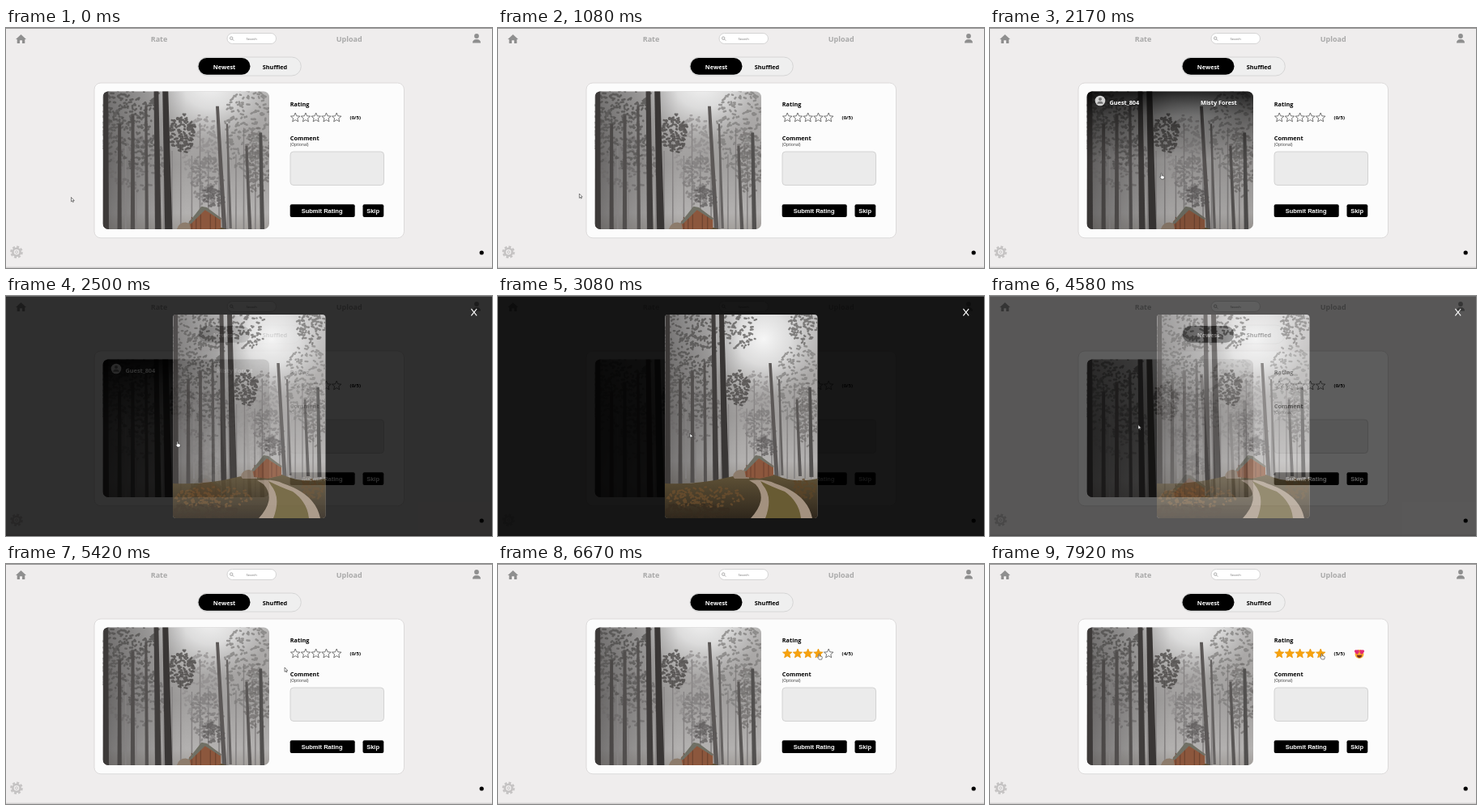
Recreate the animation shown at these times as an HTML page. Size 600x297 px, loop 8000 ms.

```html
<!DOCTYPE html>
<html lang="en">
<head>
<meta charset="utf-8">
<title>Photo rating</title>
<style>
  html, body { margin: 0; width: 100%; height: 100%; overflow: hidden; background: #efeded; }
  svg { display: block; }
  text { font: 700 7.3px "Open Sans", "Noto Sans", sans-serif; }
  .nav { font-size: 9px; fill: #a9a9a9; }
  .small { font-weight: 400; font-size: 4.9px; fill: #333; }
  .button { font: 700 7.5px "Liberation Sans", Arial, sans-serif; fill: #fff; }
  .light { fill: #fff; }
</style>
</head>
<body>
<svg id="stage" width="100%" height="100%" viewBox="0 0 600 297">
  <defs>
    <linearGradient id="fog" x2="0" y2="1">
      <stop stop-color="#c2c1c1"/><stop offset=".3" stop-color="#aaa8a7"/>
      <stop offset=".5" stop-color="#a19f9e"/><stop offset=".72" stop-color="#b3b1b0"/>
      <stop offset=".85" stop-color="#96918b"/>
    </linearGradient>
    <radialGradient id="sky" gradientUnits="userSpaceOnUse" cx="122" cy="30" r="72">
      <stop stop-color="#f6f6f6"/><stop offset=".45" stop-color="#e4e4e4" stop-opacity=".85"/>
      <stop offset="1" stop-color="#ccc" stop-opacity="0"/>
    </radialGradient>
    <linearGradient id="shade">
      <stop stop-color="#2e2c2c" stop-opacity=".5"/><stop offset=".5" stop-color="#444" stop-opacity="0"/>
    </linearGradient>
    <linearGradient id="ground" x2="0" y2="1">
      <stop stop-color="#625438"/><stop offset="1" stop-color="#2f271c"/>
    </linearGradient>
    <linearGradient id="hoverShade" x2="0" y2="1">
      <stop stop-opacity=".85"/><stop offset=".18" stop-opacity=".45"/><stop offset=".5" stop-opacity=".08"/>
    </linearGradient>
    <clipPath id="cardClip"><rect x="119.5" y="78.5" width="205.5" height="170.5" rx="7"/></clipPath>
    <clipPath id="modalClip"><rect x="206" y="23" width="188.5" height="252" rx="4"/></clipPath>

    <g id="photo">
      <rect width="189" height="252" fill="url(#fog)"/>
      <rect width="189" height="120" fill="url(#sky)"/>
      <rect width="189" height="252" fill="url(#shade)"/>
      <g id="farTrees"></g>
      <g id="nearTrees"></g>
      <path d="M0 209Q40 211 80 201T140 200T189 203V252H0Z" fill="url(#ground)"/>
      <g id="heather"></g>
      <path d="M104 205Q125 203 136 209Q176 222 182 252H106Q128 228 112 210Z" fill="#a3917f"/>
      <path d="M118 206Q134 214 148 219Q166 232 168 252H124Q134 226 121 211Z" fill="#685b33"/>
      <path d="M84 200Q86 192 94 192L104 195V203H86Z" fill="#8d7c6c"/>
      <path d="M98 191L115 175L134 187V199L117 203L100 201Z" fill="#8c573d"/>
      <path d="M101 186V201M106 184V201M111 181V202M122 183V201M128 185V200" stroke="#633c2b" stroke-width=".8"/>
      <path d="M97 193L112 174L118 175L135 188L133 189L116 178L100 194Z" fill="#707065"/>
    </g>
    <path id="arrow" d="M0 0V5.4L1.3 4.3L2.1 6.1L2.9 5.7L2.1 4H3.8Z" fill="#fff" stroke="#222" stroke-width=".55"/>
    <path id="hand" d="M-.6 .4Q0-.5 .6 .4V2.6L3.4 3.3Q4 3.6 3.8 4.6L3.2 7H0L-2 4.3Q-2 3.3-.6 4.2Z" fill="#fff" stroke="#222" stroke-width=".55"/>
  </defs>

  <rect width="600" height="297" fill="#efeded"/>
  <path d="M0 296.2H600" stroke="#c4c2c2"/>

  <!-- navigation -->
  <path d="M12 14L18.5 8L25 14H23.3V19H20V15.2H17V19H13.7V14Z" fill="#8f8f8f"/>
  <text class="nav" x="178.7" y="16.5">Rate</text>
  <text class="nav" x="407.7" y="16.5">Upload</text>
  <rect x="273" y="6.5" width="60.5" height="13" rx="6.5" fill="#fff" stroke="#ccc" stroke-width=".8"/>
  <g fill="none" stroke="#888" stroke-width=".7"><circle cx="278.2" cy="12.6" r="1.7"/><path d="M279.5 13.9L281.2 15.6"/></g>
  <text class="small" x="296.5" y="14.7" style="font-size:4.3px;fill:#777">Search</text>
  <path d="M576 18.5Q576 14 581 14T586 18.5Z" fill="#8f8f8f"/>
  <circle cx="581" cy="10" r="2.9" fill="#8f8f8f"/>

  <rect x="236.8" y="36" width="127.5" height="23" rx="11.5" fill="#efefef" stroke="#cfcfcf" stroke-width=".8"/>
  <rect x="237.5" y="37" width="64" height="20.8" rx="10.4"/>
  <text class="light" x="255.8" y="50.6">Newest</text>
  <text x="316.8" y="50.6">Shuffled</text>

  <!-- rating card -->
  <rect x="109" y="68" width="382.5" height="191.8" rx="8" fill="#fcfcfc" stroke="#d6d4d4" stroke-width=".8"/>
  <g clip-path="url(#cardClip)">
    <use href="#photo" transform="translate(119.5 31.5) scale(1.088)"/>
    <g id="hover">
      <rect x="119" y="78" width="207" height="172" fill="url(#hoverShade)"/>
      <circle cx="136" cy="90" r="6.3" fill="#d4d4d4"/>
      <path d="M132.2 93.8Q132.5 90.8 136 90.8T139.8 93.8Z" fill="#777"/>
      <circle cx="136" cy="88" r="2" fill="#777"/>
      <text class="light" x="147.5" y="94.5">Guest_804</text>
      <text class="light" x="260" y="94.5">Misty Forest</text>
    </g>
  </g>
  <text x="350.8" y="96.7">Rating</text>
  <g id="stars"></g>
  <text id="count" x="424.6" y="112.6" style="font-size:6px"></text>
  <g id="emoji">
    <circle cx="456" cy="111.5" r="5.4" fill="#f9a72b"/>
    <path d="M449.8 107.8Q450.5 105.3 453 106.6Q455.6 105.6 455.8 108Q455.6 110.5 453.3 112Q450.3 110.3 449.8 107.8ZM456.2 108Q456.4 105.6 459 106.6Q461.5 105.3 462.2 107.8Q461.7 110.3 458.7 112Q456.4 110.5 456.2 108Z" fill="#e32a73"/>
    <path d="M452.8 112.8H459.2Q458.7 116 456 116T452.8 112.8Z" fill="#733026"/>
  </g>
  <text x="350.8" y="138.6">Comment</text>
  <text class="small" x="350.8" y="146.3">(Optional)</text>
  <rect x="351" y="153" width="115.5" height="41.5" rx="4" fill="#ebebeb" stroke="#cbcbcb" stroke-width=".8"/>
  <rect x="350.7" y="218.2" width="80" height="15.8" rx="2"/>
  <text class="button" x="364.7" y="228.8">Submit Rating</text>
  <rect x="440.5" y="218.2" width="25.8" height="15.8" rx="2"/>
  <text class="button" x="445.2" y="228.8">Skip</text>

  <g fill="none" stroke="#c5c3c3">
    <circle cx="13" cy="277.3" r="4.6" stroke-width="2.6"/>
    <circle cx="13" cy="277.3" r="6.6" stroke-width="2.4" stroke-dasharray="2.9 2.283"/>
    <circle cx="13" cy="277.3" r="1.5" stroke-width="1"/>
  </g>
  <circle cx="587.2" cy="278" r="2.6"/>

  <g id="modal">
    <rect width="600" height="297" fill-opacity=".908"/>
    <g clip-path="url(#modalClip)"><use href="#photo" x="206" y="23"/></g>
    <path d="M574.4 15.8L581.2 24.4M581.2 15.8L574.4 24.4" stroke="#fff" stroke-width="1.1"/>
  </g>
  <path d="M0 .4H600" stroke="#777" stroke-width=".8"/>
  <use id="cursor" href="#arrow"/>
</svg>

<script>
const LOOP = 8000;
const $ = id => document.getElementById(id);

function add(parent, name, attributes) {
  const node = document.createElementNS("http://www.w3.org/2000/svg", name);
  for (const key in attributes) node.setAttribute(key, attributes[key]);
  return parent.appendChild(node);
}

let seed = 11;
const random = () => (seed = seed * 16807 % 2147483647) / 2147483647;

// Short strokes scattered over an ellipse suggest needles or heather.
function scatter(parent, color, count, cx, cy, rx, ry, width = 2.3) {
  let d = "";
  for (let i = 0; i < count; i++) {
    const angle = random() * 2 * Math.PI, radius = Math.sqrt(random());
    const x = cx + rx * radius * Math.cos(angle), y = cy + ry * radius * Math.sin(angle);
    d += `M${x.toFixed(1)} ${y.toFixed(1)}l${(random() * 6 - 3).toFixed(1)} ${(random() * 3 - 1).toFixed(1)}`;
  }
  add(parent, "path", { d, stroke: color, "stroke-width": width, "stroke-opacity": .7, "stroke-linecap": "round" });
}

function trunk(parent, color, x, width, top, bottom, lean = 0) {
  add(parent, "path", {
    d: `M${x - width * .35 - lean} ${top}h${width * .7}L${x + width / 2} ${bottom}h${-width}Z`, fill: color
  });
}

const far = $("farTrees"), near = $("nearTrees");
for (let i = 0; i < 16; i++) trunk(far, "#858282", 26 + i * 10.3 + random() * 5, 1.6, 75 + random() * 50, 203);
scatter(far, "#908e8d", 150, 112, 110, 22, 40);
scatter(far, "#7c7a79", 130, 118, 142, 18, 30);
scatter(far, "#7d7b7a", 210, 166, 88, 28, 52);
scatter(far, "#6f6d6c", 120, 176, 122, 15, 40);
scatter(far, "#6b6968", 130, 40, 125, 34, 32);
scatter(near, "#4c4a49", 300, 24, 36, 44, 46);
scatter(near, "#555352", 170, 28, 95, 32, 36);
scatter(near, "#52504f", 80, 90, 18, 24, 24);
scatter(near, "#5b5958", 90, 174, 14, 20, 22);
trunk(near, "#3d3a39", 3.5, 7, 0, 222);
trunk(near, "#4b4847", 19, 5, 80, 211);
trunk(near, "#514e4d", 34, 5, 70, 208);
trunk(near, "#555251", 50, 4, 60, 207, 1);
trunk(near, "#403d3c", 63, 7, 0, 212, 3);
trunk(near, "#393635", 75, 8.5, 0, 214, 5);
trunk(near, "#5c5857", 138, 5, 60, 200, 8);
trunk(near, "#666362", 145, 3, 80, 199, 4);
trunk(near, "#5a5756", 167, 4, 105, 200, 4);
trunk(near, "#52504f", 181, 5, 90, 201, 2);
scatter(near, "#403e3d", 120, 90, 90, 14, 22);
scatter(near, "#5a5857", 50, 126, 163, 12, 12);
const heather = $("heather");
scatter(heather, "#70502e", 120, 50, 226, 48, 13);
scatter(heather, "#372b1e", 100, 38, 242, 46, 9);
scatter(heather, "#5d4527", 60, 172, 216, 17, 12);

const stars = Array.from({ length: 5 }, (_, i) => {
  const points = Array.from({ length: 10 }, (_, k) => {
    const radius = k % 2 ? 2.7 : 6, angle = k * Math.PI / 5;
    return [357.2 + i * 12.75 + radius * Math.sin(angle), 111 - radius * Math.cos(angle)].join();
  });
  return add($("stars"), "polygon", { points: points.join(" "), "stroke-width": .8, "stroke-linejoin": "round" });
});

const smooth = k => (k = Math.min(1, Math.max(0, k)), k * k * (3 - 2 * k));
const fade = (t, on, off, duration) => smooth((t - on) / duration) - smooth((t - off) / duration);

// time, x, y of the cursor tip
const route = [
  [0, 80.5, 209.5], [830, 80.5, 209.5], [1850, 211.5, 180], [2600, 211.5, 180], [3080, 237, 170],
  [3400, 237, 170], [4080, 183, 159.5], [4750, 183, 159.5], [5420, 344, 128], [5800, 344, 128],
  [6100, 354, 112], [6900, 407, 111], [7500, 409.5, 111], [LOOP, 409.5, 111]
];

function cursorAt(t) {
  const next = route.findIndex(stop => stop[0] > t);
  const [t0, x0, y0] = route[next - 1], [t1, x1, y1] = route[next];
  const k = smooth((t - t0) / (t1 - t0));
  return [x0 + (x1 - x0) * k, y0 + (y1 - y0) * k];
}

function draw(t) {
  const [x, y] = cursorAt(t);
  const hover = fade(t, 1180, 2550, 200) + fade(t, 4800, 5200, 150);
  const rating = x > 350.5 && y < 118 ? Math.min(5, Math.ceil((x - 350.5) / 12.75)) : 0;

  $("hover").setAttribute("opacity", hover);
  $("modal").setAttribute("opacity", fade(t, 2265, 4470, 300));
  $("count").textContent = `(${rating}/5)`;
  $("emoji").setAttribute("opacity", t >= 7080 ? 1 : 0);
  stars.forEach((star, i) => {
    star.setAttribute("fill", i < rating ? "#f9a20b" : "#fcfcfc");
    star.setAttribute("stroke", i < rating ? "#e9970c" : "#555");
  });
  $("cursor").setAttribute("href", hover > .5 || rating ? "#hand" : "#arrow");
  $("cursor").setAttribute("transform", `translate(${x} ${y})`);
}

function tick() {
  draw(performance.now() % LOOP);
  requestAnimationFrame(tick);
}
tick();
</script>
</body>
</html>
```
